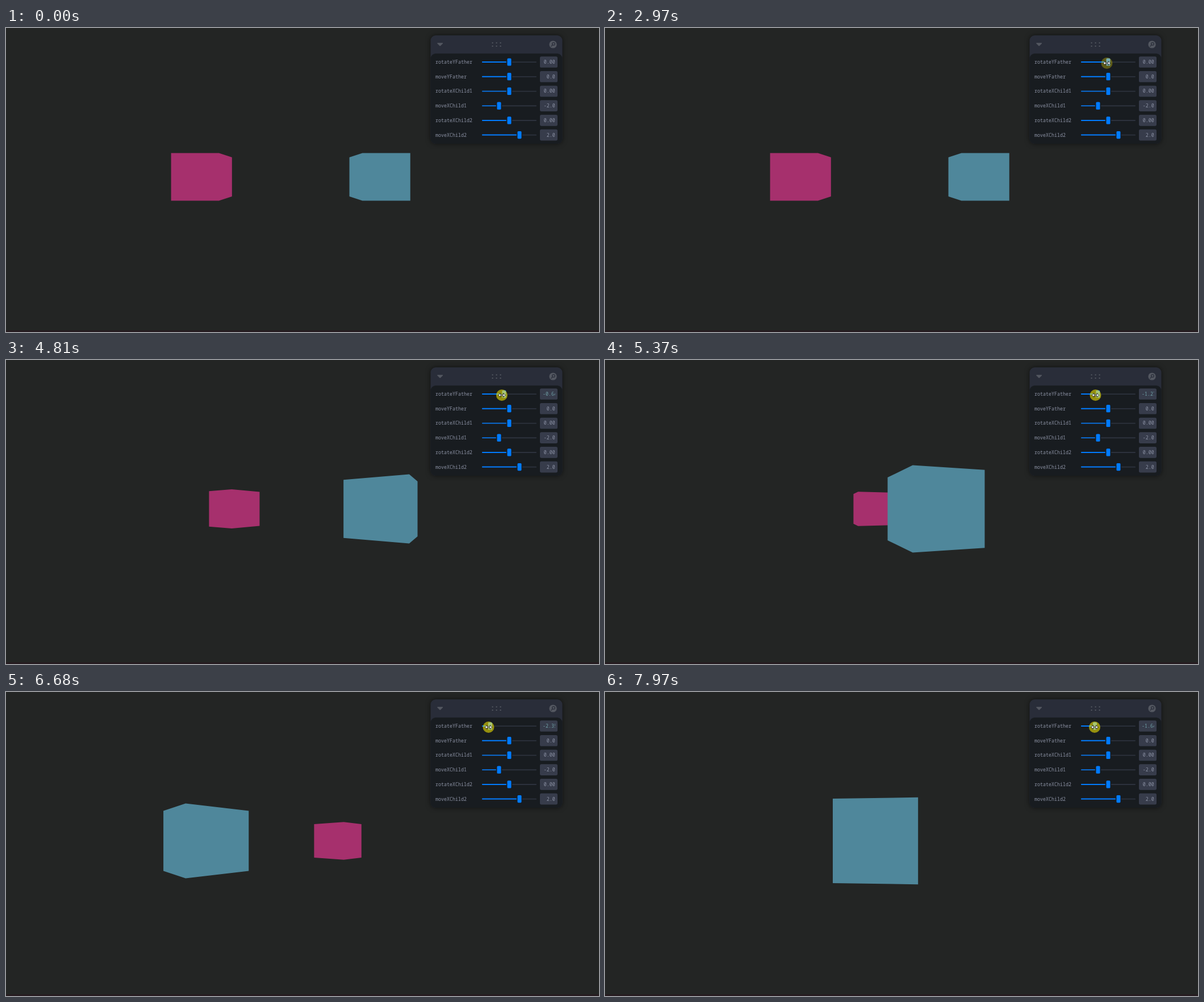
Recreate the animation shown at these times as an HTML page. Size 1044 by 536 pixels, loop 8000 ms.

```html
<!DOCTYPE html>
<html lang="en">
<head>
<meta charset="utf-8">
<title>Parent and child rotation</title>
<style>
  html, body { margin: 0; width: 100%; height: 100%; overflow: hidden; background: #232524; }
  #stage { display: block; }
  text { font: 8.35px "Noto Sans Mono", "DejaVu Sans Mono", monospace; fill: #8c92a4; white-space: pre; }
  #panel { filter: drop-shadow(0 0 4.5px #00000088); }
</style>
</head>
<body>
<svg id="stage" width="1044" height="536" viewBox="0 0 1044 536">
  <rect width="1044" height="536" fill="#232524"/>
  <rect y="533" width="1044" height="3" fill="#261c20"/>
  <path id="pink" fill="#a6306d"/>
  <path id="blue" fill="#4f879b"/>
  <g id="panel">
    <rect x="747.5" y="13" width="232" height="191" rx="9" fill="#292d39"/>
    <rect x="747.5" y="45" width="232" height="159" rx="9" fill="#181c20"/>
  </g>
  <g fill="#535760">
    <path d="M760 26.2h8.4q1.3 .3 .5 1.3l-4 4q-.7 .6-1.4 0l-4-4q-.8-1 .5-1.3z"/>
    <path id="dots"/>
    <circle cx="963" cy="29" r="6.6"/>
  </g>
  <g fill="none" stroke="#292d39" stroke-width="1.2" stroke-linecap="round">
    <circle cx="964" cy="28" r="2.4"/>
    <path d="M962.2 29.8l-2.4 2.5"/>
  </g>
  <g id="rows"></g>
  <circle id="press" r="10" fill="#fff000"/>
  <g id="cursor" fill="#fff" stroke="#000" stroke-width=".8" stroke-linejoin="round">
    <path id="arrow" d="M.4 .4V12l2.7-2.5 1.8 4 1.8-.8-1.8-3.9h3.7z"/>
    <path id="hand" d="M-1.2 1Q0-.6 1.1 1V4.6Q2.3 3.9 3 5 4.2 4.4 4.8 5.6 6.6 5.2 6.7 7V9.6L5.3 13.6H-.9L-3.9 9Q-4.4 7.3-2.8 7.5L-1.2 8.9z"/>
    <path id="resize" d="M-6.3 0l3.7-3.4v2.5h5.2v-2.5L6.3 0 2.6 3.4V.9h-5.2v2.5z"/>
  </g>
</svg>
<script>
const LOOP = 8000;
const $ = id => document.getElementById(id);

// Bursts of screen updates: first, last, count
const bursts = [
  [350, 550, 4], [950, 1700, 12], [1770, 2240, 6], [2440, 2440, 1], [2970, 3050, 2],
  [4110, 4880, 12], [4950, 5720, 12], [5790, 6350, 9], [6450, 6550, 2],
  [6610, 6890, 5], [7550, 7970, 7]
];
const angleKeys = [
  [4110, 0], [4880, -.7], [5370, -1.27], [5930, -1.83], [6550, -2.25],
  [6680, -2.35], [6890, -2.48], [7480, -2.48], [7760, -2.16], [7970, -1.64]
];
const pointerKeys = [
  [350, 991, 518], [420, 979, 440], [550, 960, 338], [880, 960, 338], [1020, 952, 305],
  [1220, 916, 175], [1360, 892, 94], [1490, 886, 66], [1700, 884, 63], [2050, 881, 61],
  [2240, 884, 61], [2440, 884, 60.5], [2970, 883.5, 62], [4040, 883.5, 62], [4110, 882, 62],
  [4880, 872, 62], [5370, 863.5, 62], [5930, 856.5, 62], [6680, 849.5, 62],
  [6890, 847.5, 62], [7480, 847.5, 62], [7760, 854, 62], [7970, 862, 62]
];

function lastUpdate(t) {
  let shown = 0;
  for (const [from, to, count] of bursts) {
    if (t < from) break;
    const gap = count > 1 ? (to - from) / (count - 1) : 1;
    shown = from + gap * Math.min(count - 1, Math.floor((t - from) / gap + .15));
  }
  return shown;
}

function sample(keys, t, column = 1) {
  const next = keys.findIndex(key => key[0] > t);
  if (next === 0) return keys[0][column];
  if (next < 0) return keys[keys.length - 1][column];
  const a = keys[next - 1], b = keys[next];
  return a[column] + (b[column] - a[column]) * (t - a[0]) / (b[0] - a[0]);
}

function add(parent, name, attrs) {
  const node = document.createElementNS("http://www.w3.org/2000/svg", name);
  set(node, attrs);
  return parent.appendChild(node);
}
function set(node, attrs) {
  for (const key in attrs) node.setAttribute(key, attrs[key]);
}

// Panel sliders
const TRACK = { left: 838, width: 96, zero: 886, travel: 90 };

function makeRow(label, index, value, range, digits) {
  const y = 60 + index * 25.72, g = $("rows");
  const thick = index === 2 || index === 3 ? 1.5 : 2;
  add(g, "text", { x: 756, y: y + 3 }).textContent = label;
  add(g, "rect", { x: TRACK.left, y: y - .8, width: TRACK.width, height: 1.8, rx: .9, fill: "#2d323d" });
  const fill = add(g, "rect", { x: TRACK.left, y: y - thick / 2, height: thick, rx: .8, fill: "#007bff" });
  const gap = add(g, "rect", { y: y - 8, width: 10.4, height: 16, rx: 2, fill: "#181c20" });
  const knob = add(g, "rect", { y: y - 6.6, width: 7, height: 13.2, rx: 1.6, fill: "#007bff" });
  add(g, "rect", { x: 940, y: y - 9.8, width: 31, height: 19.6, rx: 2.6, fill: "#373c4b" });
  const box = add(g, "svg", { x: 945, y: y - 9, width: 21.8, height: 18 });
  const text = add(box, "text", { y: 12 });
  const row = {
    knob, text,
    show(v) {
      const x = TRACK.zero + v / range * TRACK.travel / 2;
      const shown = v.toFixed(digits);
      const long = shown.length > 4;
      set(fill, { width: x - TRACK.left });
      set(gap, { x: x - 5.2 });
      set(knob, { x: x - 3.5 });
      set(text, { x: long ? 0 : 21.8, "text-anchor": long ? "start" : "end" });
      text.textContent = shown;
    }
  };
  row.show(value);
  return row;
}

const [spin] = [
  ["rotateYFather", 0], ["moveYFather", 0], ["rotateXChild1", 0],
  ["moveXChild1", -2], ["rotateXChild2", 0], ["moveXChild2", 2]
].map(([label, value], i) => makeRow(label, i, value, i % 2 ? 5 : Math.PI, i % 2 ? 1 : 2));

let dots = "";
for (let i = 0; i < 6; i++) dots += `M${855.6 + i % 3 * 7} ${i < 3 ? 25.2 : 31}h2v2h-2z`;
set($("dots"), { d: dots });

// Unit cubes on a turning axis, seen by a perspective camera
const CAMERA = { x: 501.2, y: 262.5, distance: 5, focal: 379 };

function project(x, y, z, angle) {
  const c = Math.cos(angle), s = Math.sin(angle);
  const scale = CAMERA.focal / (CAMERA.distance + x * s - z * c);
  return [CAMERA.x + (x * c + z * s) * scale, CAMERA.y - y * scale];
}

function cubePath(center, angle) {
  const ring = [[-1, -1], [1, -1], [1, 1], [-1, 1]];
  let d = "";
  for (let axis = 0; axis < 3; axis++) {
    for (const side of [-1, 1]) {
      const quad = ring.map(([u, v]) => {
        const p = [];
        p[axis] = side / 2;
        p[(axis + 1) % 3] = u * side / 2;
        p[(axis + 2) % 3] = v / 2;
        return project(p[0] + center, p[1], p[2], angle);
      });
      const [a, b, c] = quad;
      const facing = (b[0] - a[0]) * (c[1] - a[1]) - (b[1] - a[1]) * (c[0] - a[0]) < 0;
      if (facing) d += "M" + quad.map(q => q.map(n => n.toFixed(2)).join(" ")).join("L") + "z";
    }
  }
  return d;
}

function draw(time) {
  const t = lastUpdate(time);
  const angle = sample(angleKeys, t);
  set($("pink"), { d: cubePath(-2, angle) });
  set($("blue"), { d: cubePath(2, angle) });
  spin.show(angle);
  set(spin.knob, { fill: t >= 1480 ? "#3c93ff" : "#007bff" });
  spin.text.style.fill = angle < 0 ? "#6f9fa6" : "";

  const x = sample(pointerKeys, t), y = sample(pointerKeys, t, 2);
  const shape = t < 350 ? "" : t < 1480 ? "arrow" : t < 2970 ? "hand" : "resize";
  for (const id of ["arrow", "hand", "resize"]) $(id).style.display = id === shape ? "" : "none";
  set($("cursor"), { transform: `translate(${x} ${y})` });
  set($("press"), { cx: x, cy: y, opacity: t < 2970 ? 0 : t < 3050 ? .3 : .55 });
}

const start = performance.now();
function tick() {
  draw((performance.now() - start) % LOOP);
  requestAnimationFrame(tick);
}
tick();
</script>
</body>
</html>
```
